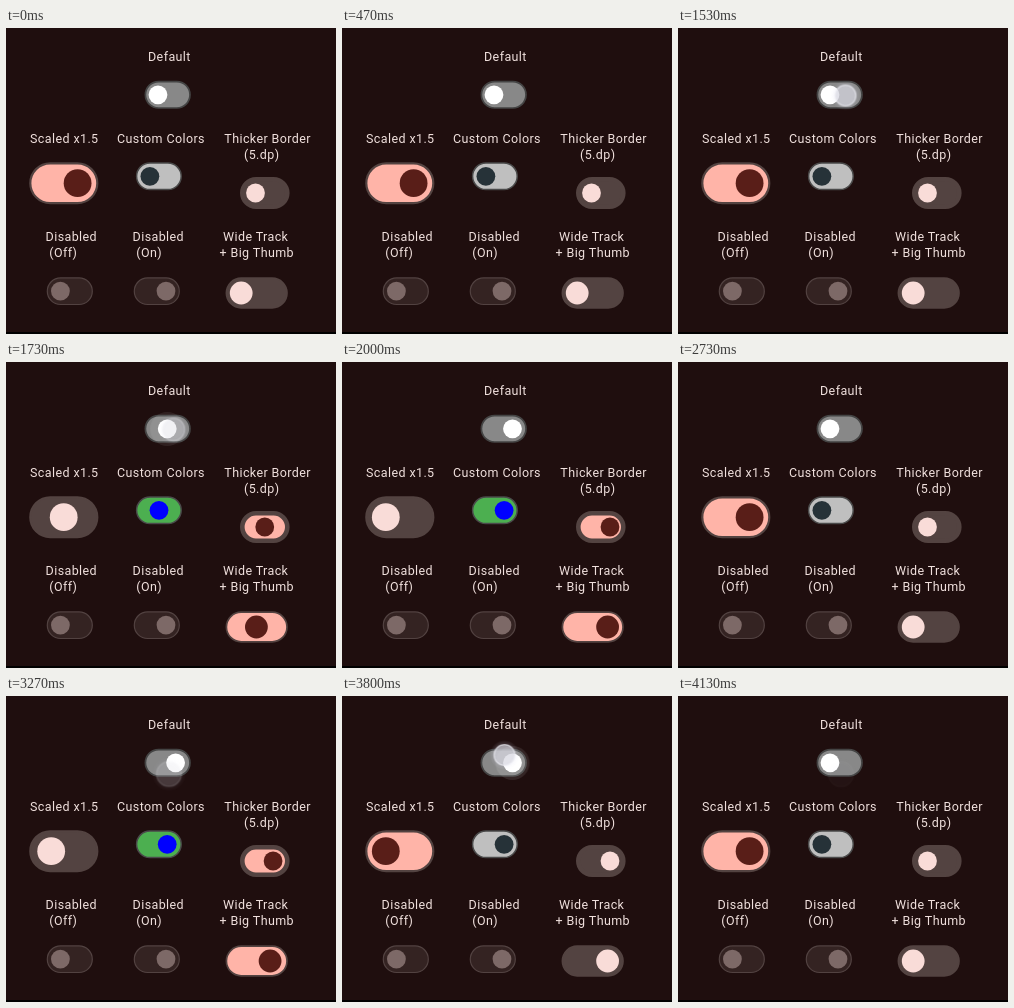
An HTML page that plays this animation: 330 px wide and 306 px high, repeating every 4.19 s.

```html
<!DOCTYPE html>
<html lang="en">
<head>
<meta charset="utf-8">
<title>Switch styles</title>
<style>
@property --p { syntax: "<number>"; inherits: true; initial-value: 0; }
@property --on { syntax: "<number>"; inherits: true; initial-value: 0; }

html, body { margin: 0; width: 100%; height: 100%; overflow: hidden; background: #1f0e0e; }

svg {
  display: block;
  width: 330px;
  height: 306px;
  --loop: 4190ms step-end infinite;
  animation: slide var(--loop), flip var(--loop);
}

text { font: 12.5px Roboto, sans-serif; letter-spacing: .4px; fill: #f0e0dd; }

/* --a / --b: colour before and after the flip, --d: thumb travel */
.track, .thumb {
  fill: color-mix(in srgb, var(--b) calc(var(--on) * 100%), var(--a));
}
.track { stroke: var(--line, #534341); stroke-width: var(--w, 1.7px); }
.thumb, .ripple { transform: translateX(calc(var(--p) * var(--d))); }

.rest { --a: #534341; --b: #ffb4a8; }
.rest.thumb { --a: #f9dcd8; --b: #591e18; }
.lit { --a: #ffb4a8; --b: #534341; }
.lit.thumb { --a: #591e18; --b: #f9dcd8; }

.off-track { fill: #342322; stroke: #524241; stroke-width: 1.2px; }
.off-thumb { fill: #7d6967; }

.ripple { fill: #fff; opacity: 0; animation: ripple var(--loop); }
.touch { opacity: 0; animation: touch var(--loop); }
.dot { fill: rgb(214 214 222 / .62); stroke: rgb(236 236 242 / .65); stroke-width: 1.4px; }
.glow { fill: url(#glow); }

@keyframes flip {
  0% { --on: 0; }
  39.83% { --on: 1; }
  57.25% { --on: 0; }
  74.68% { --on: 1; }
  90.67%, 100% { --on: 0; }
}

@keyframes slide {
  0% { --p: 0; }
  41.26% { --p: .5; }
  42.93% { --p: .95; }
  44.6% { --p: 1; }
  58.92% { --p: .5; }
  60.36% { --p: .05; }
  62.02% { --p: 0; }
  76.35% { --p: .5; }
  78.02% { --p: .95; }
  79.45% { --p: 1; }
  92.34% { --p: .5; }
  93.77% { --p: .05; }
  95.44%, 100% { --p: 0; }
}

@keyframes ripple {
  0% { opacity: 0; }
  39.83% { opacity: .08; }
  42.93% { opacity: 0; }
  57.25% { opacity: .08; }
  60.36% { opacity: 0; }
  74.68% { opacity: .1; }
  76.35% { opacity: .05; }
  78.02% { opacity: 0; }
  90.67% { opacity: .1; }
  92.34% { opacity: .05; }
  93.77%, 100% { opacity: 0; }
}

@keyframes touch {
  0% { opacity: 0; transform: translate(167.5px, 67.5px); }
  36.49% { opacity: 1; transform: translate(167.5px, 67.5px); }
  39.83% { opacity: .8; transform: translate(167.5px, 67.5px); }
  41.26% { opacity: .5; transform: translate(167.5px, 67.5px) scale(1.08); }
  42.93% { opacity: .3; transform: translate(167.5px, 67.5px) scale(1.15); }
  44.6% { opacity: .15; transform: translate(167.5px, 67.5px) scale(1.2); }
  46.04% { opacity: .05; transform: translate(167.5px, 67.5px) scale(1.2); }
  47.7% { opacity: 0; transform: translate(166px, 69px); }
  54.15% { opacity: 1; transform: translate(166px, 69px); }
  57.25% { opacity: .8; transform: translate(166px, 69px); }
  58.92% { opacity: .5; transform: translate(166px, 69px) scale(1.08); }
  60.36% { opacity: .3; transform: translate(166px, 69px) scale(1.15); }
  62.02% { opacity: .15; transform: translate(166px, 69px) scale(1.2); }
  63.7% { opacity: .05; transform: translate(166px, 69px) scale(1.2); }
  65.13% { opacity: 0; transform: translate(163px, 62px); }
  73.24% { opacity: 1; transform: translate(163px, 62px); }
  74.68% { opacity: 1; transform: translate(163px, 64px); }
  76.35% { opacity: .6; transform: translate(163px, 74px) scale(1.08); }
  78.02% { opacity: .3; transform: translate(163px, 78px) scale(1.18); }
  79.45% { opacity: .1; transform: translate(163px, 78px) scale(1.2); }
  81.12% { opacity: 0; transform: translate(162.5px, 58px); }
  89% { opacity: 1; transform: translate(162.5px, 58px); }
  90.67% { opacity: 1; transform: translate(162.5px, 59px); }
  92.34% { opacity: .7; transform: translate(163px, 71px); }
  93.77% { opacity: .45; transform: translate(163px, 78px) scale(1.1); }
  95.44% { opacity: .25; transform: translate(163px, 78px) scale(1.15); }
  97.11% { opacity: .12; transform: translate(163px, 78px) scale(1.18); }
  98.54% { opacity: .04; transform: translate(163px, 78px) scale(1.2); }
  99.95%, 100% { opacity: 0; transform: translate(163px, 78px); }
}
</style>
</head>
<body>
<svg viewBox="0 0 330 306">
  <defs>
    <radialGradient id="glow">
      <stop offset=".55" stop-color="#dcdcf0" stop-opacity=".3"/>
      <stop offset="1" stop-color="#dcdcf0" stop-opacity="0"/>
    </radialGradient>
  </defs>
  <rect width="330" height="306" fill="#1f0e0e"/>
  <rect y="304" width="330" height="2" fill="#000"/>

  <text x="142" y="33">Default</text>
  <text x="24" y="115">Scaled x1.5</text>
  <text x="111" y="115">Custom Colors</text>
  <text x="218.3" y="115">Thicker Border</text>
  <text x="238" y="131">(5.dp)</text>
  <text x="39.6" y="213">Disabled</text>
  <text x="43.3" y="229">(Off)</text>
  <text x="126.6" y="213">Disabled</text>
  <text x="130.3" y="229">(On)</text>
  <text x="217" y="213">Wide Track</text>
  <text x="213.5" y="229">+ Big Thumb</text>

  <g style="--d: 18.5px">
    <rect class="track" x="139.4" y="53.6" width="44.6" height="26.4" rx="13.2" style="--a: #888; --b: #888; --line: #444"/>
    <circle class="ripple" cx="152" cy="67" r="17"/>
    <circle class="thumb" cx="152" cy="66.8" r="9.4" style="--a: #fff; --b: #fff"/>
  </g>

  <g style="--d: -27.8px">
    <rect class="track lit" x="24.3" y="135.3" width="67" height="39.8" rx="19.9" style="--w: 2.2px"/>
    <circle class="thumb lit" cx="71.6" cy="155.2" r="13.9"/>
  </g>

  <g style="--d: 18.2px">
    <rect class="track" x="130.6" y="135" width="44.6" height="26.6" rx="13.3" style="--a: #bfbfbf; --b: #4caf50; --line: #4a4a4a; --w: 1.5px"/>
    <circle class="thumb" cx="143.9" cy="148.3" r="9.4" style="--a: #263238; --b: #00f"/>
  </g>

  <g style="--d: 18.5px">
    <rect class="track rest" x="236.3" y="151.3" width="45" height="27.4" rx="13.7" style="--w: 4.6px"/>
    <circle class="thumb rest" cx="249.5" cy="165" r="9.4"/>
  </g>

  <rect class="off-track" x="41.3" y="249.9" width="45" height="26.6" rx="13.3"/>
  <circle class="off-thumb" cx="54.4" cy="263.1" r="9.4"/>
  <rect class="off-track" x="128.3" y="249.9" width="45" height="26.6" rx="13.3"/>
  <circle class="off-thumb" cx="160" cy="263.1" r="9.4"/>

  <g style="--d: 30.4px">
    <rect class="track rest" x="220.4" y="250.2" width="60.6" height="29.6" rx="14.8"/>
    <circle class="thumb rest" cx="235.2" cy="265" r="11.4"/>
  </g>

  <g class="touch">
    <circle class="glow" r="15"/>
    <circle class="dot" r="10.4"/>
  </g>
</svg>
</body>
</html>
```
